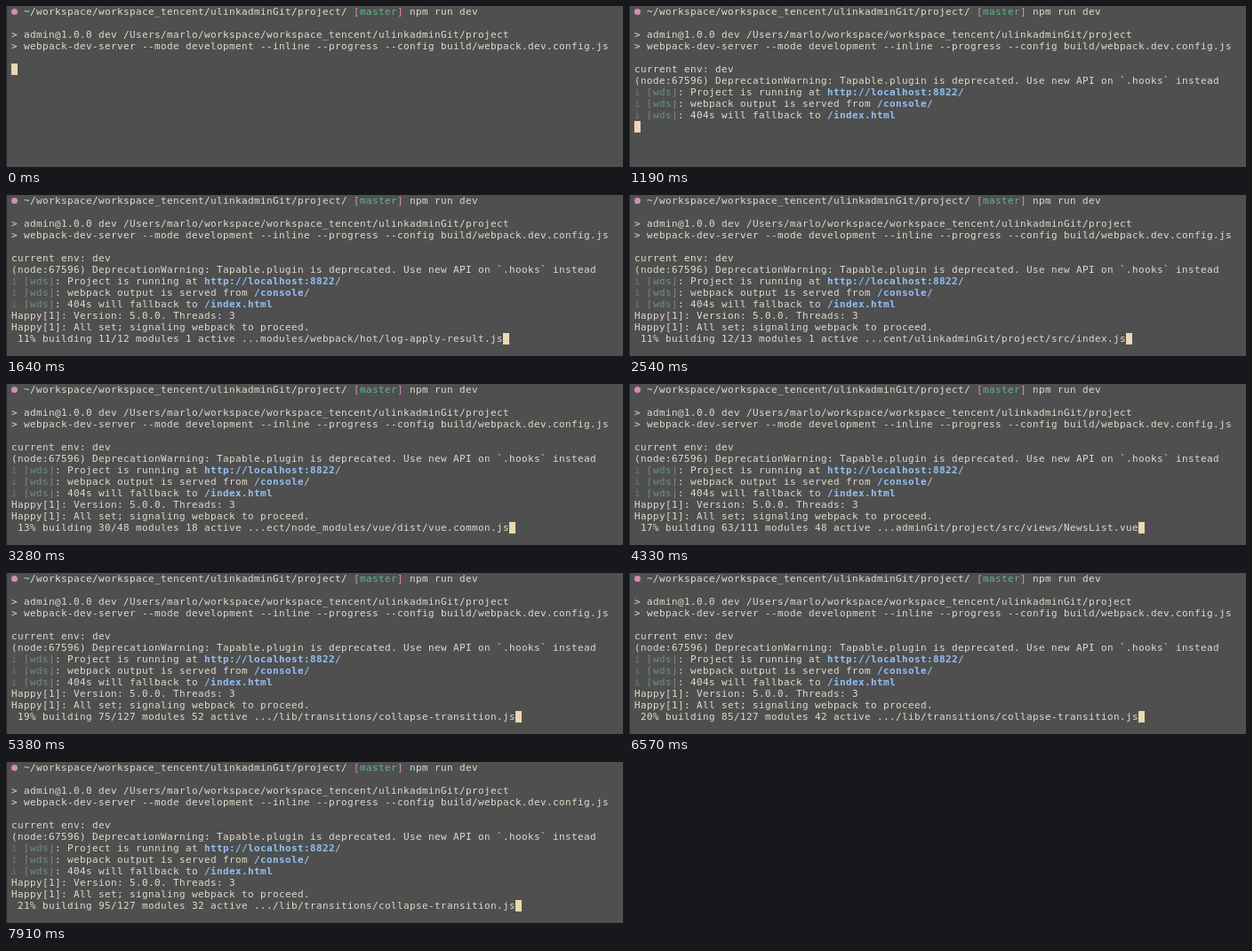
Animation of 694x182 px, one loop 8000 ms. Source, as an HTML page:

```html
<!DOCTYPE html>
<html lang="en">
<head>
<meta charset="utf-8">
<title>Dev server start</title>
<style>
  html, body { margin: 0; width: 100%; height: 100%; overflow: hidden; background: #4f4f4f; }
  #term {
    position: absolute; left: 0; top: 0; width: 694px; height: 182px;
    overflow: hidden; background: #4f4f4f; color: #dcdccc;
    box-shadow: inset 1px 0 #262626;
    font: 11px/13px "DejaVu Sans Mono", monospace;
    letter-spacing: calc(7px - 1ch);
    font-variant-ligatures: none;
  }
  .row { position: absolute; left: 6px; height: 13px; white-space: pre; }
  .pink { color: #dc8cc3; }
  .green { color: #60b48a; }
  .dim { color: #709080; }
  .info { color: #7d6b7b; }
  .link { color: #94bff3; font-weight: bold; }
  #mark { position: absolute; left: 6px; top: 3px; width: 7px; height: 7px; border-radius: 50%; background: #d58cb4; }
  #cursor { position: absolute; width: 7px; height: 13px; background: #ead8b0; }
</style>
</head>
<body>
<div id="term"><div id="mark"></div><div id="cursor"></div></div>
<script>
const LOOP = 8000, COL = 7, ROW = 13, LEFT = 6;
const term = document.getElementById('term');
const cursor = document.getElementById('cursor');

const span = (kind, text) => `<span class="${kind}">${text}</span>`;
const wds = (text, link) =>
  `${span('info', 'i')} ${span('dim', '⌈wds⌋')}: ${text} ${span('link', link)}`;

const lines = [
  `  ~/workspace/workspace_tencent/ulinkadminGit/project/ ${span('pink', '[')}${span('green', 'master')}${span('pink', ']')} npm run dev`,
  '',
  '&gt; admin@1.0.0 dev /Users/marlo/workspace/workspace_tencent/ulinkadminGit/project',
  '&gt; webpack-dev-server --mode development --inline --progress --config build/webpack.dev.config.js',
  '',
  'current env: dev',
  '(node:67596) DeprecationWarning: Tapable.plugin is deprecated. Use new API on `.hooks` instead',
  wds('Project is running at', 'http://localhost:8822/'),
  wds('webpack output is served from', '/console/'),
  wds('404s will fallback to', '/index.html'),
  'Happy[1]: Version: 5.0.0. Threads: 3',
  'Happy[1]: All set; signaling webpack to proceed.'
];

const addRow = (html, i) => {
  const row = document.createElement('div');
  row.className = 'row';
  row.style.top = i * ROW + 'px';
  row.innerHTML = html;
  term.insertBefore(row, cursor);
  return row;
};
const rows = lines.map(addRow);
const progress = addRow('', lines.length);

// [start ms, number of printed lines]
const prints = [[0, 5], [750, 6], [1050, 7], [1190, 10], [1340, 12]];

const root = 'workspace_tencent/ulinkadminGit/project/';
const src = root + 'src/';
const mods = root + 'node_modules/';
const collapse = mods + 'element-ui/lib/transitions/collapse-transition.js';

// [start ms, modules done, modules known, current file]
const builds = [
  [1490, 1, 2, mods + 'webpack-dev-server/client/index.js'],
  [1640, 11, 12, mods + 'webpack/hot/log-apply-result.js'],
  [2540, 12, 13, src + 'index.js'],
  [2840, 17, 26, src + 'router/index.js'],
  [3130, 24, 39, mods + 'vue-router/dist/vue-router.esm.js'],
  [3280, 30, 48, mods + 'vue/dist/vue.common.js'],
  [3430, 36, 60, mods + 'axios/lib/core/Axios.js'],
  [3580, 42, 74, mods + 'axios/lib/helpers/bind.js'],
  [3730, 48, 84, src + 'store/modules/user.js'],
  [3880, 54, 96, src + 'views/Login.vue'],
  [4330, 63, 111, src + 'views/NewsList.vue'],
  [4480, 64, 113, src + 'views/NewsEdit.vue'],
  [4630, 66, 116, src + 'views/UserList.vue'],
  [4780, 68, 120, src + 'components/Header.vue'],
  [4930, 70, 123, src + 'components/Sidebar.vue'],
  [5080, 72, 127, collapse],
  [5230, 74, 127, collapse],
  [5380, 75, 127, collapse],
  [5680, 76, 127, collapse],
  [5830, 78, 127, collapse],
  [6130, 81, 127, collapse],
  [6420, 84, 127, collapse],
  [6570, 85, 127, collapse],
  [6870, 86, 127, collapse],
  [7020, 87, 127, collapse],
  [7170, 88, 127, collapse],
  [7470, 90, 127, collapse],
  [7620, 91, 127, collapse],
  [7770, 93, 127, collapse],
  [7910, 95, 127, collapse]
];

const current = (steps, t) => steps.filter(s => s[0] <= t).pop();

function buildText([, done, total, file]) {
  const percent = Math.floor(10 + done * 0.12);
  return ` ${percent}% building ${done}/${total} modules ${total - done} active ...${file.slice(-39)}`;
}

function draw() {
  const t = performance.now() % LOOP;
  const shown = current(prints, t)[1];
  const build = current(builds, t);
  const text = build ? buildText(build) : '';

  rows.forEach((row, i) => { row.style.visibility = i < shown ? 'visible' : 'hidden'; });
  if (progress.textContent !== text) progress.textContent = text;
  cursor.style.left = LEFT + text.length * COL + 'px';
  cursor.style.top = shown * ROW + 'px';
  requestAnimationFrame(draw);
}
draw();
</script>
</body>
</html>
```
